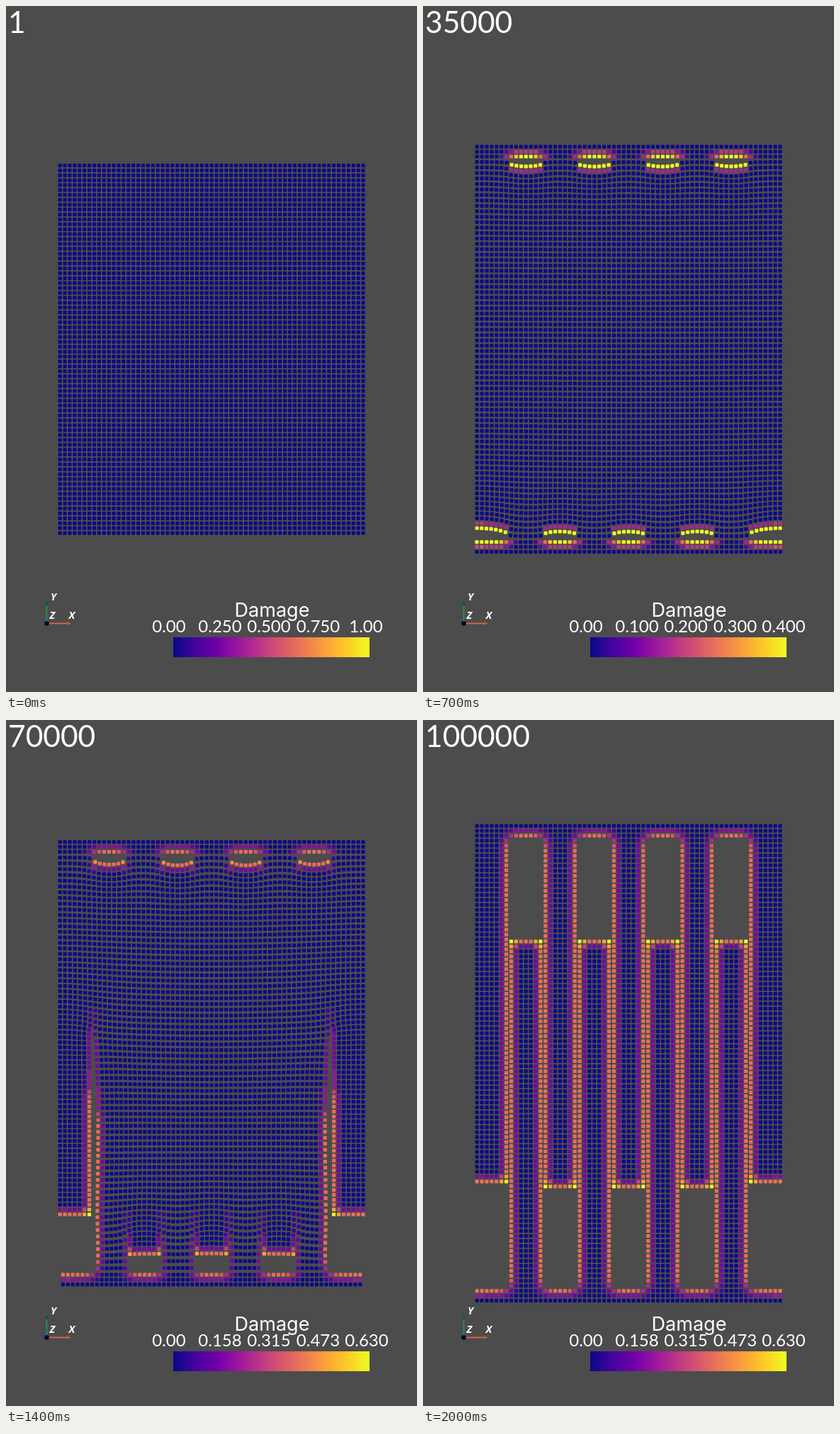
Recreate the animation shown at these times as an HTML page with a canvas. Size 580x966 px, loop 2100 ms.

```html
<!DOCTYPE html>
<html lang="en">
<head>
<meta charset="utf-8">
<title>Damage</title>
<style>
html, body { margin: 0; width: 100%; height: 100%; overflow: hidden; background: #4c4c4c; }
canvas { display: block; }
</style>
</head>
<body>
<canvas id="stage" width="580" height="966"></canvas>
<script>
const ctx = document.getElementById('stage').getContext('2d');
const STEPS = 21, STEP_MS = 100;
const COLS = 63, ROWS = 76, HALF = 32;      // left half is solved, right half mirrored
const X0 = 76.2, Y0 = 224.6, GAP = 6.9, PULL = 3.775;
const TOP = -1, BOTTOM = -2;
const ANCHOR = 0.002;                       // weak sideways hold that keeps loose strips upright
const NARROW = 0.75;

// Bonds join each node to the neighbours within sqrt(5) spacings
const bonds = [];
for (let dy = -2; dy <= 2; dy++)
  for (let dx = -2; dx <= 2; dx++) {
    const r2 = dx * dx + dy * dy;
    if (r2 > 0 && r2 <= 5) bonds.push([dx, dy]);
  }
const near = bonds.filter(([dx, dy]) => dx * dx + dy * dy <= 2);
const LEFT = near.findIndex(([dx, dy]) => dx === -1 && dy === 0);
const RIGHT = near.findIndex(([dx, dy]) => dx === 1 && dy === 0);

const stops = ['0d0887', '46039f', '7201a8', '9c179e', 'bd3786',
               'd8576b', 'ed7953', 'fb9f3a', 'fdca26', 'f0f921']
  .map(h => [0, 2, 4].map(k => parseInt(h.slice(k, k + 2), 16)));

function plasma(f) {
  const p = Math.max(0, Math.min(1, f)) * (stops.length - 1);
  const k = Math.min(stops.length - 2, Math.floor(p));
  const c = stops[k].map((a, m) => Math.round(a + (stops[k + 1][m] - a) * (p - k)));
  return `rgb(${c})`;
}

function curve(pts, n) {
  if (n <= pts[0][0]) return pts[0][1];
  for (let k = 1; k < pts.length; k++) {
    const [a, p] = pts[k - 1], [b, q] = pts[k];
    if (n <= b) return p + (q - p) * (n - a) / (b - a);
  }
  return pts[pts.length - 1][1];
}

// Row reached by the crack tips, growing down from the top and up from the bottom
const downFast = [[12, 3], [14, 6], [18, 48], [19, 62], [20, 100]];
const downSlow = [[12, 3], [14, 6], [18, 37], [19, 56], [20, 100]];
const upOuter = [[8, 73], [10, 64], [14, 29], [18, -20]];
const upInner = [[9, 73], [10, 71], [14, 63], [19, 59]];

function tipsAt(n) {
  return [0, 1, 2, 3].map(p => [
    curve(p === 1 ? downFast : downSlow, n),
    curve(p === 0 ? upOuter : upInner, n)
  ]);
}

function zone(i, j) {
  return j < 3 ? TOP : j > 72 ? BOTTOM : Math.floor(i / 7);
}

function broken(i, j, dx, dy, n, tips) {
  if (n < 2) return false;
  const a = zone(i, j), b = zone(i + dx, j + dy);
  if (a === b) return false;
  const lo = Math.min(a, b), hi = Math.max(a, b);
  if (lo === TOP) return hi % 2 === 1;
  if (lo === BOTTOM) return hi % 2 === 0;
  const [down, up] = tips[lo > 3 ? 7 - lo : lo];
  const mid = j + dy / 2, lag = 4.5 * (dx * dx + dy * dy - 1);
  return mid < down - lag || mid > up + lag;
}

function damageAt(n, tips) {
  const out = new Float64Array(HALF * ROWS);
  for (let j = 0; j < ROWS; j++)
    for (let i = 0; i < HALF; i++) {
      let all = 0, cut = 0;
      for (const [dx, dy] of bonds) {
        if (i + dx < 0 || j + dy < 0 || j + dy >= ROWS) continue;
        all++;
        if (broken(i, j, dx, dy, n, tips)) cut++;
      }
      out[j * HALF + i] = cut / all;
    }
  return out;
}

// Elastic equilibrium of the spring lattice by over-relaxation
function solve(u, v, n, tips) {
  const w = 1.9, mid = HALF - 1;
  const alive = new Uint8Array(HALF * ROWS * 8);
  for (let j = 0; j < ROWS; j++)
    for (let i = 0; i < HALF; i++)
      near.forEach(([dx, dy], d) => {
        const a = i + dx, b = j + dy;
        if (a >= 0 && a < HALF && b >= 0 && b < ROWS && !broken(i, j, dx, dy, n, tips))
          alive[(j * HALF + i) * 8 + d] = 1;
      });
  const step = near.map(([dx, dy]) => dy * HALF + dx);
  const kind = near.map(([dx, dy]) => dx * dy);
  const flat = near.map(([, dy]) => dy === 0);

  for (let it = 0; it < 160; it++)
    for (let j = 0; j < ROWS; j++)
      for (let i = 0; i < HALF; i++) {
        const p = j * HALF + i;
        const fixU = i === mid || (i === 0 && j < 73);
        const fixV = j < 3 || j > 72;
        if (fixU && fixV) continue;
        let su = 0, wu = fixV ? 0 : ANCHOR, sv = 0, wv = 0;
        for (let d = 0; d < 8; d++) {
          if (!alive[p * 8 + d]) continue;
          const q = p + step[d], s = kind[d];
          if (s) {
            su += 0.25 * (u[q] + s * (v[q] - v[p]));
            sv += 0.25 * (v[q] + s * (u[q] - u[p]));
            wu += 0.25;
            wv += 0.25;
          } else if (flat[d]) {
            su += u[q];
            wu++;
          } else {
            const k = i === mid ? 0.5 : 1;
            sv += k * v[q];
            wv += k;
          }
        }
        if (!fixU) {
          u[p] += w * (su / wu - u[p]);
          // strips may touch but not overlap
          if (i > 0 && !alive[p * 8 + LEFT]) u[p] = Math.max(u[p], u[p - 1]);
          if (!alive[p * 8 + RIGHT]) u[p] = Math.min(u[p], u[p + 1]);
        }
        if (!fixV && wv) v[p] += w * (sv / wv - v[p]);
      }
}

// Freed strips move rigidly, with a little stretch left over
function release(v, load) {
  for (let j = 0; j < ROWS; j++)
    for (let i = 0; i < HALF; i++) {
      const s = zone(i, j), p = j * HALF + i;
      if (s === TOP) v[p] = -load;
      else if (s === BOTTOM) v[p] = load;
      else if (s % 2) v[p] = load - 9 * (73 - j) / 70;
      else v[p] = -load + (s ? 11 : 4) * (j - 2) / 70;
    }
}

const states = [];
function nextState() {
  const n = states.length, tips = tipsAt(n), size = HALF * ROWS, load = n * PULL;
  const u = new Float64Array(size), v = new Float64Array(size);
  if (n === STEPS - 1) release(v, load);
  else if (n > 0) {
    const last = states[n - 1];
    for (let p = 0; p < size; p++) {
      const j = Math.floor(p / HALF);
      u[p] = last.u[p];
      v[p] = n > 1 ? last.v[p] * n / (n - 1) : load * (j - 37.5) / 35.5;
      if (j < 3) v[p] = -load;
      if (j > 72) v[p] = load;
    }
    solve(u, v, n, tips);
  }
  return { u, v, damage: damageAt(n, tips) };
}

function text(str, x, y, font, align = 'center') {
  ctx.font = font;
  ctx.textAlign = align;
  ctx.fillStyle = '#fff';
  ctx.fillText(str, x, y);
}

function line(x1, y1, x2, y2, color, width) {
  ctx.strokeStyle = color;
  ctx.lineWidth = width;
  ctx.beginPath();
  ctx.moveTo(x1, y1);
  ctx.lineTo(x2, y2);
  ctx.stroke();
}

function tri(color, ...pts) {
  ctx.fillStyle = color;
  ctx.beginPath();
  for (const [x, y] of pts) ctx.lineTo(x, y);
  ctx.fill();
}

function drawAxes() {
  line(57.5, 869.5, 57.5, 843, '#1f9463', 1.6);
  line(57.5, 869.5, 87, 869.5, '#f0674a', 1.6);
  tri('#12573b', [55, 844], [57.5, 837], [60, 844]);
  tri('#c4553e', [86, 867], [92, 869.5], [86, 872]);
  ctx.fillStyle = '#04043f';
  ctx.beginPath();
  ctx.arc(57.5, 869.5, 3.3, 0, 7);
  ctx.fill();
  const font = 'italic bold 14.5px "Open Sans", sans-serif';
  text('Y', 67, 837, font);
  text('Z', 65.5, 863, font);
  text('X', 93, 863, font);
}

function drawLegend(max) {
  text('Damage', 375.5, 860, '400 27px Inter, sans-serif');
  [230, 302, 371, 440.5, max < 1 ? 509 : 508].forEach((x, k) =>
    text((max * k / 4 + (k ? 1e-9 : 0)).toPrecision(3), x, 882, '400 24px Lato, sans-serif'));
  const bands = 64, left = 236, width = 277;
  for (let k = 0; k < bands; k++) {
    const a = Math.round(left + width * k / bands);
    const b = Math.round(left + width * (k + 1) / bands);
    ctx.fillStyle = plasma(k / (bands - 1));
    ctx.fillRect(a, 889, b - a, 28);
  }
}

function drawNodes(n, max) {
  const { u, v, damage } = states[n];
  for (let j = 0; j < ROWS; j++)
    for (let i = 0; i < COLS; i++) {
      const flip = i >= HALF, m = flip ? COLS - 1 - i : i, p = j * HALF + m;
      const x = X0 + GAP * i + (flip ? -NARROW : NARROW) * u[p];
      const y = Y0 + GAP * j + v[p];
      ctx.fillStyle = plasma(damage[p] / max);
      ctx.beginPath();
      ctx.roundRect(x - 2.6, y - 2.6, 5.2, 5.2, 1.2);
      ctx.fill();
    }
}

function draw(n) {
  while (states.length <= n) states.push(nextState());
  const max = n < 2 ? 1 : n < 9 ? 0.4 : n < 12 ? 0.48 : 0.63;
  ctx.fillStyle = '#4c4c4c';
  ctx.fillRect(0, 0, 580, 966);
  drawNodes(n, max);
  drawAxes();
  drawLegend(max);
  text(String(n * 5000 || 1), 3, 37.5, '400 42.5px Lato, sans-serif', 'left');
}

const start = performance.now();
let shown = -1;
function tick() {
  const n = Math.floor((performance.now() - start) / STEP_MS) % STEPS;
  if (n !== shown) draw(shown = n);
  requestAnimationFrame(tick);
}
tick();
</script>
</body>
</html>
```
